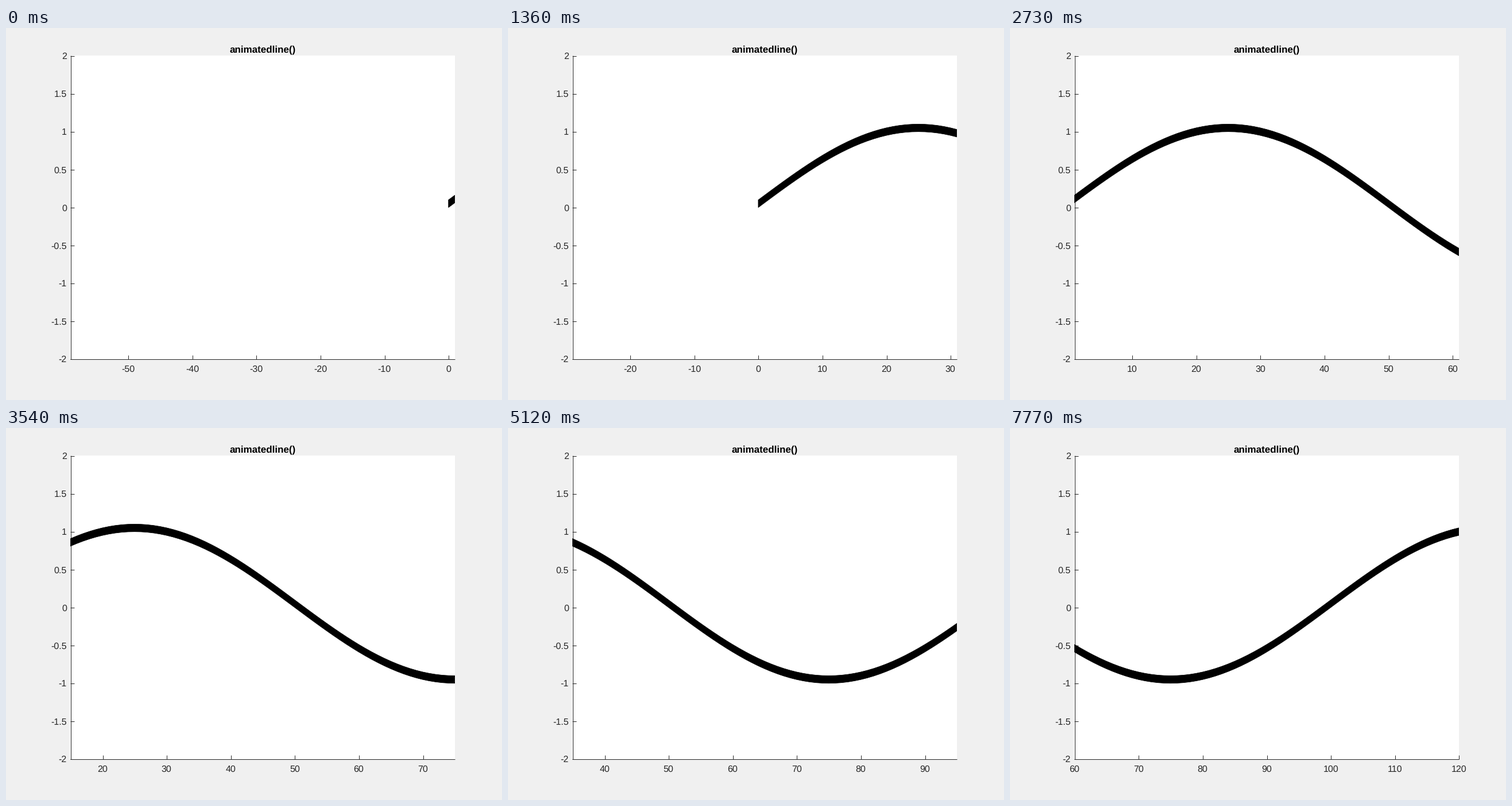
Animation, 864 px wide and 648 px high, one loop 7800 ms. Source, as a matplotlib script:

```python
import numpy as np
import matplotlib.pyplot as plt
from matplotlib.animation import FuncAnimation
from matplotlib.patches import Polygon, Rectangle

W, H, DPI = 864, 648, 100
LOOP, STEP = 7800, 20
PX = 72 / DPI                                   # points per pixel
LEFT, RIGHT = 0.13 * W, 0.905 * W
TOP, BOTTOM = 0.075 * H, 0.89 * H
SPAN = 60                                       # width of the sliding window
INK = "#262626"

plt.rcParams["font.family"] = "Liberation Sans"
plt.rcParams["text.hinting"] = "none"

# The line grows one sample at a time, ever slower, with a few short stalls
KEY_HEADS = [1, 2, 19, 20, 31, 39, 40, 59, 61, 73, 75, 88, 95, 108, 120]
KEY_TIMES = [0, 70, 830, 920, 1360, 1620, 1740, 2440, 2730, 3230, 3540,
             4300, 5120, 6380, 7770]
GROWTH = np.interp(np.arange(1, 121), KEY_HEADS, KEY_TIMES)


def to_x(v, head):
    return LEFT + (v - head + SPAN) / SPAN * (RIGHT - LEFT)


def to_y(v):
    return TOP + (2 - v) / 4 * (BOTTOM - TOP)


def pixel(v):
    return np.floor(v) + 0.5


fig = plt.figure(figsize=(W / DPI, H / DPI), dpi=DPI, facecolor="#f0f0f0")
ax = fig.add_axes([0, 0, 1, 1])
ax.set_xlim(0, W)
ax.set_ylim(H, 0)
ax.axis("off")


def rule(xs, ys):
    return ax.plot(xs, ys, color=INK, lw=PX, solid_capstyle="butt", zorder=2)[0]


def label(x, y, text, ha, size=16, **kw):
    return ax.text(x, y, text, ha=ha, va="baseline", fontsize=size * PX, **kw)


box = ax.add_patch(Rectangle((112, 48), 670, 529, fc="white", lw=0, zorder=1))
label((LEFT + RIGHT) / 2, 42, "animatedline()", "center", 17,
      weight="bold", color="black")

rule([pixel(LEFT)] * 2, [48, 577])
rule([112, 782], [pixel(BOTTOM)] * 2)
for v in np.arange(-2, 2.5, 0.5):
    y = to_y(v)
    rule([112, 119], [pixel(y)] * 2)
    label(106, y + 5.7, f"{v:g}", "right", color=INK)

ticks = [(rule([0, 0], [570, 577]), label(0, 599, "", "center", color=INK))
         for _ in range(7)]
band = ax.add_patch(Polygon([(0, 0)] * 3, fc="black", ec="black",
                            lw=0.77 * PX, zorder=3))
band.set_clip_path(box)


def draw(i):
    t = i * STEP + STEP / 2
    head = int(np.searchsorted(GROWTH, t, side="right"))

    x = np.arange(max(0, head - SPAN), head + 1)
    low = np.sin(2 * np.pi * x / 100)
    edge_x = to_x(np.r_[x, x[::-1]], head)
    edge_y = to_y(np.r_[low, low[::-1] + 0.1])
    band.set_xy(np.c_[edge_x, edge_y])

    first = -(-(head - SPAN) // 10) * 10
    for k, (mark, text) in enumerate(ticks):
        v = first + 10 * k
        shown = v <= head
        mark.set_visible(shown)
        text.set_visible(shown)
        px = to_x(v, head)
        mark.set_xdata([pixel(px)] * 2)
        text.set_x(px)
        text.set_text(str(v))
    return [band]


anim = FuncAnimation(fig, draw, frames=LOOP // STEP, interval=STEP,
                     repeat=True, repeat_delay=0, blit=False)
plt.show()
```
